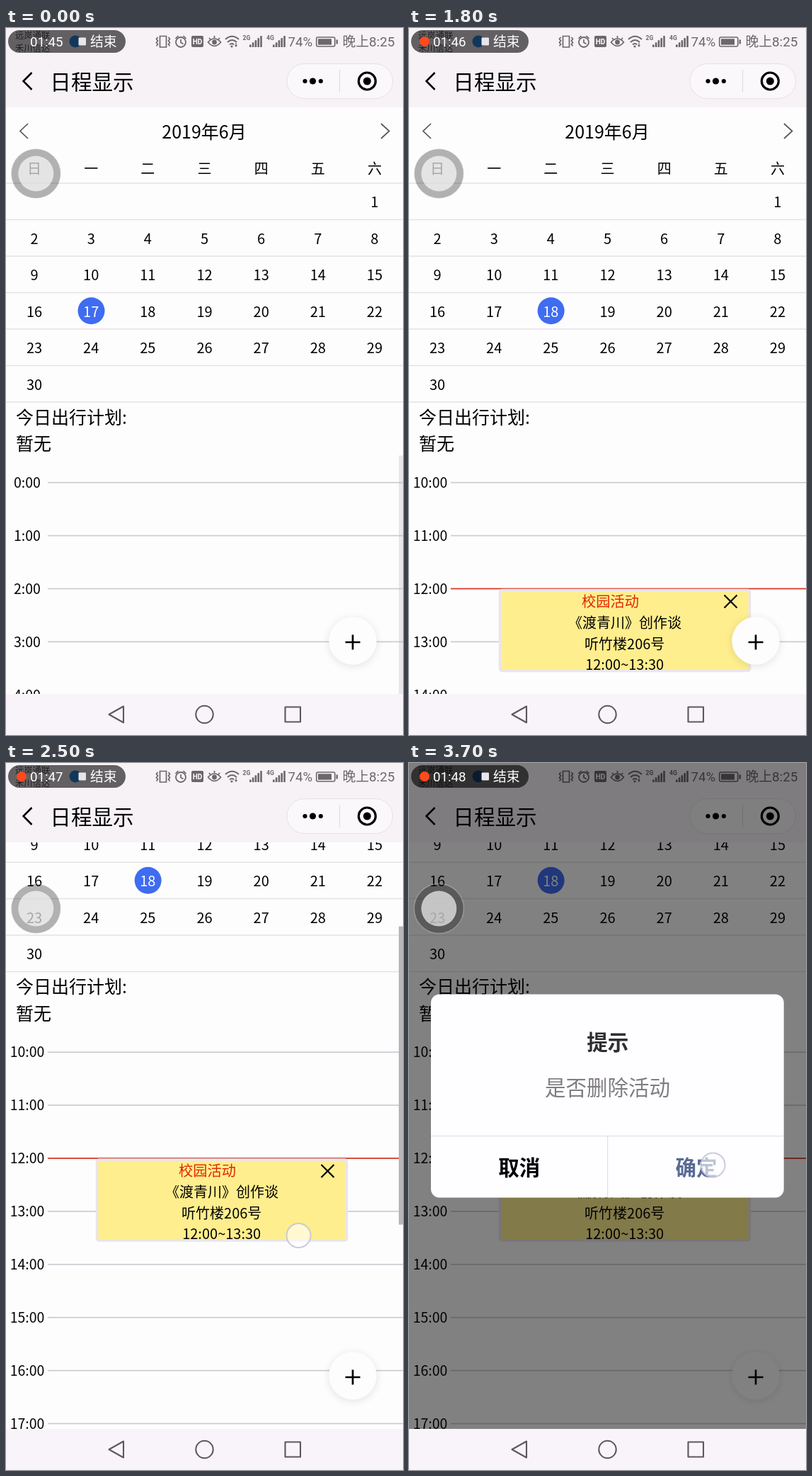
An HTML page for the animation above (3800 ms loop, 561 px wide and 998 px high).

```html
<!DOCTYPE html>
<html lang="zh-CN">
<head>
<meta charset="utf-8">
<title>日程显示</title>
<style>
html, body { margin: 0; width: 100%; height: 100%; overflow: hidden; background: #fefdfe; }
svg { display: block; width: 100vw; height: 100vh; }
text { font-family: "Noto Sans CJK SC", "Noto Sans CJK", "Noto Sans", sans-serif; }
.ui { font-family: Roboto, "Noto Sans CJK SC", "Noto Sans CJK", sans-serif; }
.line { fill: none; stroke: #000; }
.gray { stroke: #6b676b; }
</style>
</head>
<body>
<svg id="stage" viewBox="0 0 561 998"></svg>
<script>
const LOOP = 3800, HOUR = 74.9, ROW = 51.5, COL = 561 / 7;
const stage = document.getElementById('stage');

// y is the optical middle of the text line
const text = (s, x, y, size, more = '') =>
  `<text x="${x}" y="${y + size * 0.37}" font-size="${size}" ${more}>${s}</text>`;
const mid = (s, x, y, size, more = '') => text(s, x, y, size, `text-anchor="middle" ${more}`);
const rect = (x, y, w, h, fill, more = '') =>
  `<rect x="${x}" y="${y}" width="${w}" height="${h}" fill="${fill}" ${more}/>`;
const circle = (x, y, r, fill, more = '') =>
  `<circle cx="${x}" cy="${y}" r="${r}" fill="${fill}" ${more}/>`;
const path = (d, width, more = 'class="line"') => `<path d="${d}" stroke-width="${width}" ${more}/>`;
const list = (n, f) => Array.from({ length: n }, (_, i) => f(i)).join('');

function calendar() {
  const day = i => {
    const n = i + 1, x = COL * ((i + 6) % 7 + 0.5), y = 245.8 + ROW * Math.floor((i + 6) / 7);
    const dot = n === 17 || n === 18 ? circle(x + 0.3, y - 1, 19, '#3f6cf0', `id="dot${n}"`) : '';
    return dot + mid(n, x, y, 20, `id="day${n}"`);
  };
  return path('M31 135L20 145.5L31 156M530 135L541.5 145.5L530 156', 1.7, 'fill="none" stroke="#555"') +
    mid('2019年6月', 280, 146.5, 25) +
    list(7, i => mid('日一二三四五六'[i], COL * (i + 0.5), 199, 20)) +
    list(7, i => rect(0, 218.3 + ROW * i, 561, 1.5, '#e5e2e8')) +
    list(30, day) +
    text('今日出行计划:', 14, 549.5, 25) + text('暂无', 14, 587, 25);
}

function card() {
  const y = 641.7 + HOUR * 12;
  return rect(128.5, y + 2, 353, 114, '#ffee8d', 'rx="3" stroke="#e9e5ec" stroke-width="3.5"') +
    mid('校园活动', 284.5, y + 18, 20.2, 'fill="#e22400"') +
    path(`M445.5 ${y + 9}l18 18m0 -18l-18 18`, 2.2) +
    mid('《渡青川》创作谈', 305, y + 48, 20) +
    mid('听竹楼206号', 304.7, y + 77.6, 20) +
    mid('12:00~13:30', 304.7, y + 107, 20);
}

const schedule = () => list(25, h => {
  const y = 641.7 + HOUR * h;
  return mid(h + ':00', 30, y, 19.5) + rect(59, y - 0.9, 502, 1.8, h === 12 ? '#d43a2a' : '#cfccd3');
}) + card();

const bars = x => list(5, i => rect(x + i * 3.8, 23.5 - i * 3.1, 2.6, 3.5 + i * 3.1, '#6b676b'));

const statusBar = () => `<g fill="#6b676b">` +
  text('远岚通联', 13, 10, 12.3, 'fill="#4c484c"') + text('禾川信达', 13, 28, 12.3, 'fill="#4c484c"') +
  circle(98, 19, 8.5, '#2c8be0') +
  path('M217.5 11.5h9v15.5h-9zM214.5 13l-2 2.5l2 2.5l-2 2.5l2 2.5l-2 2.5M229.5 13l2 2.5l-2 2.5l2 2.5l-2 2.5l2 2.5', 1.7, 'class="line gray"') +
  circle(247, 20, 7, 'none', 'class="gray" stroke-width="1.8"') +
  path('M247 16v4.5l3.5 2M239.5 15l4 -4M254.5 15l-4 -4', 1.7, 'class="line gray"') +
  rect(262, 11, 17, 16, '#6b676b', 'rx="2"') +
  mid('HD', 270.5, 19, 10, 'class="ui" font-weight="700" fill="#fff"') +
  path('M285.5 20q9 -10 18 0q-9 11 -18 0zM287 14l2 2.5M294.5 11v3M302 14l-2 2.5', 1.7, 'class="line gray"') +
  circle(294.5, 20, 3.4, '#6b676b') +
  path('M310 16q9.5 -8.5 19 0M313 20q6.5 -6 13 0M316 23.5q3.5 -3 6 0', 2, 'class="line gray"') +
  circle(319, 26, 1.6, '#6b676b') +
  path('M325 21v5m-1.5 -2l1.5 2l1.5 -2', 1.2, 'class="line gray"') +
  text('2G', 334.5, 14, 8.5, 'class="ui" font-weight="700"') + bars(344) +
  text('4G', 368, 14, 8.5, 'class="ui" font-weight="700"') + bars(377) +
  text('74%', 398.5, 19.5, 18.6, 'class="ui"') +
  rect(438.7, 13, 26, 13, 'none', 'rx="2" class="gray" stroke-width="1.6"') +
  rect(441, 15.3, 19, 8.4, '#6b676b') + rect(466.5, 16.5, 2.4, 6, '#6b676b') +
  text('晚上8:25', 475.5, 19.5, 18.8, 'class="ui"') + '</g>';

const header = () => rect(0, 0, 561, 112, '#f6f2f6') + statusBar() +
  path('M36.5 63L24.5 75L36.5 87', 2.5) + text('日程显示', 62.3, 76.5, 29.6) +
  rect(397, 50.5, 149.5, 49, '#fbf8fb', 'rx="24.5" stroke="#e5e1e6"') +
  circle(422.5, 75, 3.1, '#000') + circle(433.5, 75, 4.6, '#000') + circle(444.8, 75, 3.1, '#000') +
  rect(471, 59, 1, 32, '#dcd8dd') +
  circle(510.3, 75, 12, 'none', 'stroke="#000" stroke-width="3.2"') + circle(510.3, 75, 5.5, '#000');

const modal = () => `<g id="modal">` + rect(31, 326.5, 498.7, 287, '#fefdff', 'rx="12"') +
  mid('提示', 280.8, 394, 29.6, 'font-weight="700" fill="#2f2d30"') +
  mid('是否删除活动', 280.5, 458, 29.5, 'fill="#807d81"') +
  rect(31, 526, 498.7, 1.2, '#e3dfe5') + rect(280, 526, 1.2, 87, '#e3dfe5') +
  mid('取消', 155.8, 571, 29.5, 'font-weight="700"') +
  mid('确定', 406, 571, 29.5, 'font-weight="700" fill="#576b95"') + '</g>';

const navBar = () => rect(0, 940, 561, 58, '#f9f4f9') +
  `<g fill="none" stroke="#5c585d" stroke-width="2.1" stroke-linejoin="round">
  <path d="M145.5 969L166 957.5V980.5Z"/><circle cx="280.5" cy="969" r="12.2"/>
  <path d="M394.5 958.5h21.5v21h-21.5z"/></g>`;

stage.innerHTML = `<defs>
  <clipPath id="view"><rect y="112" width="561" height="828"/></clipPath>
  <clipPath id="box"><rect y="603.5" width="561" height="1123"/></clipPath>
  <filter id="soft" x="-50%" y="-50%" width="200%" height="200%"><feGaussianBlur stdDeviation="6"/></filter>
  </defs>` + rect(0, 0, 561, 998, '#fefdfe') +
  `<g clip-path="url(#view)"><g id="page">${calendar()}
    <g clip-path="url(#box)"><g id="list">${schedule()}</g>
    ${rect(555, 603, 6, 672, '#b9b6bb', 'id="listBar"')}</g></g>
    ${rect(555, 112, 6, 421, '#b9b6bb', 'id="pageBar"')}</g>` +
  header() +
  circle(490, 867, 34, '#000', 'opacity=".1" filter="url(#soft)"') + circle(490, 865, 33.7, '#fefdfe') +
  path('M479.5 867h21M490 856.5v21', 2.7) +
  rect(0, 0, 561, 940, '#000', 'id="dim"') + modal() + navBar() +
  rect(3, 3, 166, 32, '#000', 'rx="16" opacity=".6"') +
  circle(22, 19, 7, '#ff4a1c', 'id="rec"') +
  text('', 34, 19.5, 18.7, 'class="ui" fill="#fff" id="timer"') +
  rect(102.5, 13.5, 10.5, 11, '#e8e6ea', 'rx="1"') + text('结束', 119, 19.5, 18.8, 'fill="#fff"') +
  circle(42.3, 205.5, 35, '#000', 'fill-opacity=".3" stroke="#fff" stroke-opacity=".25" stroke-width="1.5"') +
  circle(42.3, 205.5, 25, '#fff', 'opacity=".65"') +
  circle(0, 0, 17, '#fff', 'id="touch" fill-opacity=".6" stroke="#c4c2da" stroke-opacity=".85" stroke-width="2"');

const el = id => document.getElementById(id);
const set = (id, name, value) => el(id).setAttribute(name, value);

// piecewise linear value through [time, value] points
function along(t, keys) {
  if (t <= keys[0][0]) return keys[0][1];
  for (let i = 1; i < keys.length; i++) {
    const [a, u] = keys[i - 1], [b, v] = keys[i];
    if (t <= b) return u + (v - u) * (t - a) / (b - a);
  }
  return keys[keys.length - 1][1];
}

// from, to, x, start y, end y
const gestures = [
  [400, 500, 200, 400, 400],
  [1200, 1400, 415, 820, 520],
  [1900, 2200, 414, 752, 610],
  [2300, 2500, 413.5, 781, 667],
  [2700, 2800, 454, 576, 576],
  [3600, 3700, 429.5, 567.5, 567.5]
];

function draw(t) {
  const page = along(t, [[1800, 0], [1900, 3], [2100, 94.5], [2200, 128], [2300, 136], [2400, 183], [2500, 233.5]]);
  const scroll = along(t, [[1100, 0], [1200, 30], [1300, 150], [1400, 345], [1500, 542.6], [1600, 690], [1700, 749]]);
  set('page', 'transform', `translate(0 ${-page})`);
  set('list', 'transform', `translate(0 ${-scroll})`);
  set('listBar', 'y', 603 + scroll * 0.6);
  set('listBar', 'opacity', t < 1200 ? along(t, [[0, 0.32], [500, 0]]) : along(t, [[1800, 1], [2000, 0]]));
  set('pageBar', 'y', 112 + page * 0.508);
  set('pageBar', 'opacity', t < 1900 ? 0 : along(t, [[2600, 1], [2900, 0]]));

  const chosen = t < 700 ? 17 : 18;
  for (const n of [17, 18]) {
    set('dot' + n, 'opacity', +(n === chosen));
    set('day' + n, 'fill', n === chosen ? '#fff' : '#000');
  }

  set('dim', 'opacity', along(t, [[2900, 0], [3000, 0.14], [3200, 0.41], [3400, 0.49]]));
  set('modal', 'opacity', along(t, [[2900, 0], [3000, 0.35], [3200, 1]]));

  const beat = t % 1000;
  set('rec', 'opacity', beat < 900 ? along(beat, [[200, 0], [400, 1]]) : 0);
  el('timer').textContent = '01:' + (45 + Math.floor(t / 1000));

  const g = gestures.find(([a, b]) => t >= a && t <= b);
  set('touch', 'opacity', g ? 1 : 0);
  if (g) {
    set('touch', 'cx', g[2]);
    set('touch', 'cy', along(t, [[g[0], g[3]], [g[1], g[4]]]));
  }
}

const start = performance.now();
function tick() {
  const t = (performance.now() - start) % LOOP;
  draw(Math.floor(t / 100) * 100);
  requestAnimationFrame(tick);
}
tick();
</script>
</body>
</html>
```
